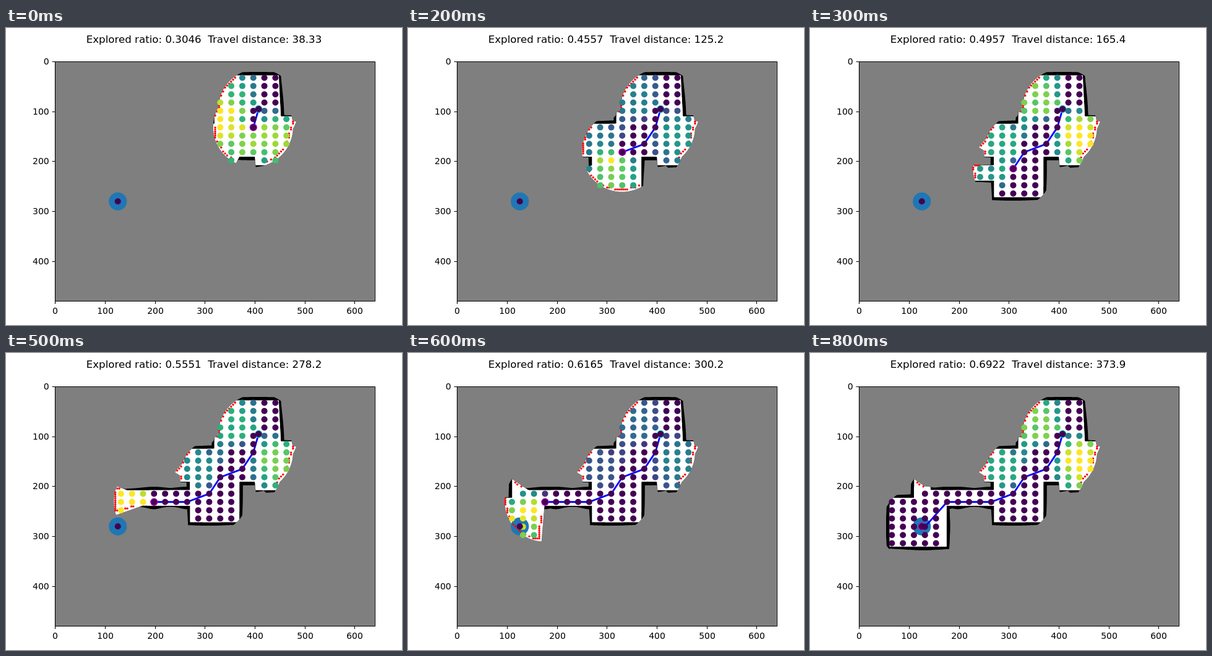
Write an HTML page with a canvas that moves like this. It is 640 px wide and 480 px high and loops after 0.9 s.

```html
<!DOCTYPE html>
<html lang="en">
<head>
<meta charset="utf-8">
<title>Exploration map</title>
<style>
html, body { margin: 0; width: 100%; height: 100%; overflow: hidden; background: #fff; }
canvas { display: block; }
</style>
</head>
<body>
<canvas id="stage" width="640" height="480"></canvas>
<script>
const ctx = document.getElementById('stage').getContext('2d');
const STEP = 100, LOOP = 900, TAU = Math.PI * 2;
const LEFT = 79.5, TOP = 54, SCALE = 0.8067;
const RANGE = 80, WALL_DEPTH = 7, VIEW = 70, RAYS = 720, CELL = 4;
const W = 640, H = 480;

// Walls as polylines in map units
const walls = [
  [[320, 28], [448, 28], [452, 110], [500, 110]],
  [[334, 55], [328, 84]],
  [[319, 105], [319, 125], [230, 125]],
  [[235, 191], [270, 191], [270, 208], [143, 208], [143, 165]],
  [[110, 165], [110, 223], [61, 223], [61, 321], [175, 321], [175, 239],
   [270, 239], [270, 272], [369, 272], [369, 191], [400, 191], [400, 208], [500, 208]]
];
const segments = walls.flatMap(line => line.slice(1).map((p, i) => [line[i], p]));

const node = (col, row) => [65 + 22.1 * col, 32.3 + 16.56 * row];
const start = [407, 95], goal = [125, 280];
const route = [start, node(15, 6), node(14, 8), node(12, 9), node(11, 11), node(9, 12),
  node(6, 12), node(5, 12), node(3, 15), goal];
const ratios = ['0.3046', '0.3713', '0.4557', '0.4957', '0.5207', '0.5551', '0.6165', '0.6916', '0.6922'];
const lengths = ['38.33', '78.04', '125.2', '165.4', '212.3', '278.2', '300.2', '366.9', '373.9'];

const viridis = ['440154', '472d7b', '3b528b', '2c728e', '21918c', '28ae80', '5ec962', 'addc30', 'fde725']
  .map(hex => [0, 2, 4].map(i => parseInt(hex.slice(i, i + 2), 16)));

function shade(v) {
  const pos = v * (viridis.length - 1);
  const i = Math.min(Math.floor(pos), viridis.length - 2);
  const mix = viridis[i].map((a, k) => Math.round(a + (viridis[i + 1][k] - a) * (pos - i)));
  return `rgb(${mix})`;
}

// Distance along a unit ray to the nearest wall, or max
function cast([x, y], dx, dy, max) {
  let best = max;
  for (const [a, b] of segments) {
    const ex = b[0] - a[0], ey = b[1] - a[1];
    const det = dx * ey - dy * ex;
    if (Math.abs(det) < 1e-9) continue;
    const px = a[0] - x, py = a[1] - y;
    const t = (px * ey - py * ex) / det;
    const u = (px * dy - py * dx) / det;
    if (t > 0 && t < best && u > -1e-3 && u < 1.001) best = t;
  }
  return best;
}

// Area seen from one spot: open floor, and floor plus wall surface
function scan(p) {
  const floor = new Path2D(), solid = new Path2D();
  for (let i = 0; i < RAYS; i++) {
    const a = (i + 0.5) / RAYS * TAU, dx = Math.cos(a), dy = Math.sin(a);
    const near = cast(p, dx, dy, RANGE);
    const far = Math.min(RANGE, near + WALL_DEPTH);
    floor.lineTo(p[0] + dx * near, p[1] + dy * near);
    solid.lineTo(p[0] + dx * far, p[1] + dy * far);
  }
  floor.closePath();
  solid.closePath();
  return { floor, solid };
}

function drawMap(g, scans, unknown) {
  g.fillStyle = unknown;
  g.fillRect(0, 0, W, H);
  g.fillStyle = '#000';
  scans.forEach(s => g.fill(s.solid));
  g.fillStyle = '#fff';
  scans.forEach(s => g.fill(s.floor));
}

const probe = document.createElement('canvas');
probe.width = W;
probe.height = H;
const probeCtx = probe.getContext('2d', { willReadFrequently: true });

const FREE = 0, UNKNOWN = 1, WALL = 2;

// Unknown area is painted red here, so blended wall edges stay neutral
function classify(red, green) {
  if (red - green > 20) return UNKNOWN;
  return green < 180 ? WALL : FREE;
}

// Free cells on the rim of the unknown area
function findFrontiers(scans) {
  drawMap(probeCtx, scans, '#f00');
  const data = probeCtx.getImageData(0, 0, W, H).data;
  const cols = W / CELL, rows = H / CELL;
  const cells = new Uint8Array(cols * rows);
  for (let y = 0; y < H; y++) {
    for (let x = 0; x < W; x++) {
      const c = Math.floor(y / CELL) * cols + Math.floor(x / CELL);
      const i = (y * W + x) * 4;
      cells[c] = Math.max(cells[c], classify(data[i], data[i + 1]));
    }
  }
  const found = [];
  for (let r = 1; r < rows - 1; r++) {
    for (let c = 1; c < cols - 1; c++) {
      if (cells[r * cols + c] !== FREE) continue;
      let unknown = 0;
      for (let j = -1; j <= 1; j++) {
        for (let i = -1; i <= 1; i++) {
          if (cells[(r + j) * cols + c + i] === UNKNOWN) unknown++;
        }
      }
      if (unknown > 2 && unknown < 8) found.push([c * CELL, r * CELL]);
    }
  }
  return found;
}

function sees(a, b) {
  const dx = b[0] - a[0], dy = b[1] - a[1], d = Math.hypot(dx, dy);
  return d < VIEW && (d < 1e-6 || cast(a, dx / d, dy / d, d) >= d);
}

function buildStep(n) {
  const path = route.slice(0, n + 2);
  const scans = allScans.slice(0, n + 2);
  const frontiers = findFrontiers(scans);
  const nodes = [];
  for (let col = 0; col < 20; col++) {
    for (let row = 0; row < 19; row++) {
      const p = node(col, row);
      if (!scans.some(s => probeCtx.isPointInPath(s.floor, p[0], p[1]))) continue;
      const visited = path.some(q => Math.hypot(p[0] - q[0], p[1] - q[1]) < 1);
      const count = visited ? 0 : frontiers.filter(f => sees(p, f)).length;
      nodes.push({ p, value: count < 5 ? 0 : count });
    }
  }
  const top = Math.max(1, ...nodes.map(d => d.value));
  nodes.forEach(d => { d.value /= top; });
  nodes.push({ p: start, value: 0 }, { p: goal, value: 0 });
  const title = `Explored ratio: ${ratios[n]}  Travel distance: ${lengths[n]}`;
  return { path, scans, frontiers, nodes, title };
}

const allScans = route.map(scan);
const steps = ratios.map((_, n) => buildStep(n));

// Plotted values sit at the centre of a map cell
const toX = x => LEFT + (x + 0.5) * SCALE, toY = y => TOP + (y + 0.5) * SCALE;

function disc([x, y], r, color) {
  ctx.fillStyle = color;
  ctx.beginPath();
  ctx.arc(toX(x), toY(y), r, 0, TAU);
  ctx.fill();
}

function drawAxes() {
  ctx.strokeStyle = ctx.fillStyle = '#000';
  ctx.lineWidth = 1.1;
  ctx.strokeRect(79.5, 54.5, 517, 387);
  ctx.font = '14px "DejaVu Sans", sans-serif';
  ctx.beginPath();
  for (let v = 0; v <= 600; v += 100) {
    const x = Math.floor(toX(v)) + 0.5;
    ctx.moveTo(x, 441);
    ctx.lineTo(x, 446);
    ctx.textAlign = 'center';
    ctx.fillText(v, x, 462);
    if (v > 400) continue;
    const y = Math.floor(toY(v)) + 0.5;
    ctx.moveTo(74.5, y);
    ctx.lineTo(79.5, y);
    ctx.textAlign = 'right';
    ctx.fillText(v, 69.7, Math.round(y + 4.5));
  }
  ctx.stroke();
}

function draw({ path, scans, frontiers, nodes, title }) {
  ctx.fillStyle = '#fff';
  ctx.fillRect(0, 0, 640, 480);
  ctx.save();
  ctx.translate(LEFT, TOP);
  ctx.scale(SCALE, SCALE);
  drawMap(ctx, scans, '#7f7f7f');
  ctx.restore();

  disc(goal, 14.6, '#1f77b4');
  frontiers.forEach(f => disc(f, 1.7, '#f00'));

  ctx.strokeStyle = '#00f';
  ctx.lineWidth = 2.8;
  ctx.lineJoin = 'round';
  ctx.beginPath();
  path.forEach(([x, y]) => ctx.lineTo(toX(x), toY(y)));
  ctx.stroke();

  disc(path[path.length - 1], 6.2, '#bf00bf');
  disc(start, 6.2, '#00bfbf');
  nodes.forEach(d => disc(d.p, 5, shade(d.value)));

  drawAxes();
  ctx.font = '16.67px "DejaVu Sans", sans-serif';
  ctx.textAlign = 'center';
  ctx.fillText(title, 320, 24);
}

let shown = -1;
function tick() {
  const n = Math.floor(performance.now() % LOOP / STEP);
  if (n !== shown) draw(steps[shown = n]);
  requestAnimationFrame(tick);
}
tick();
</script>
</body>
</html>
```
